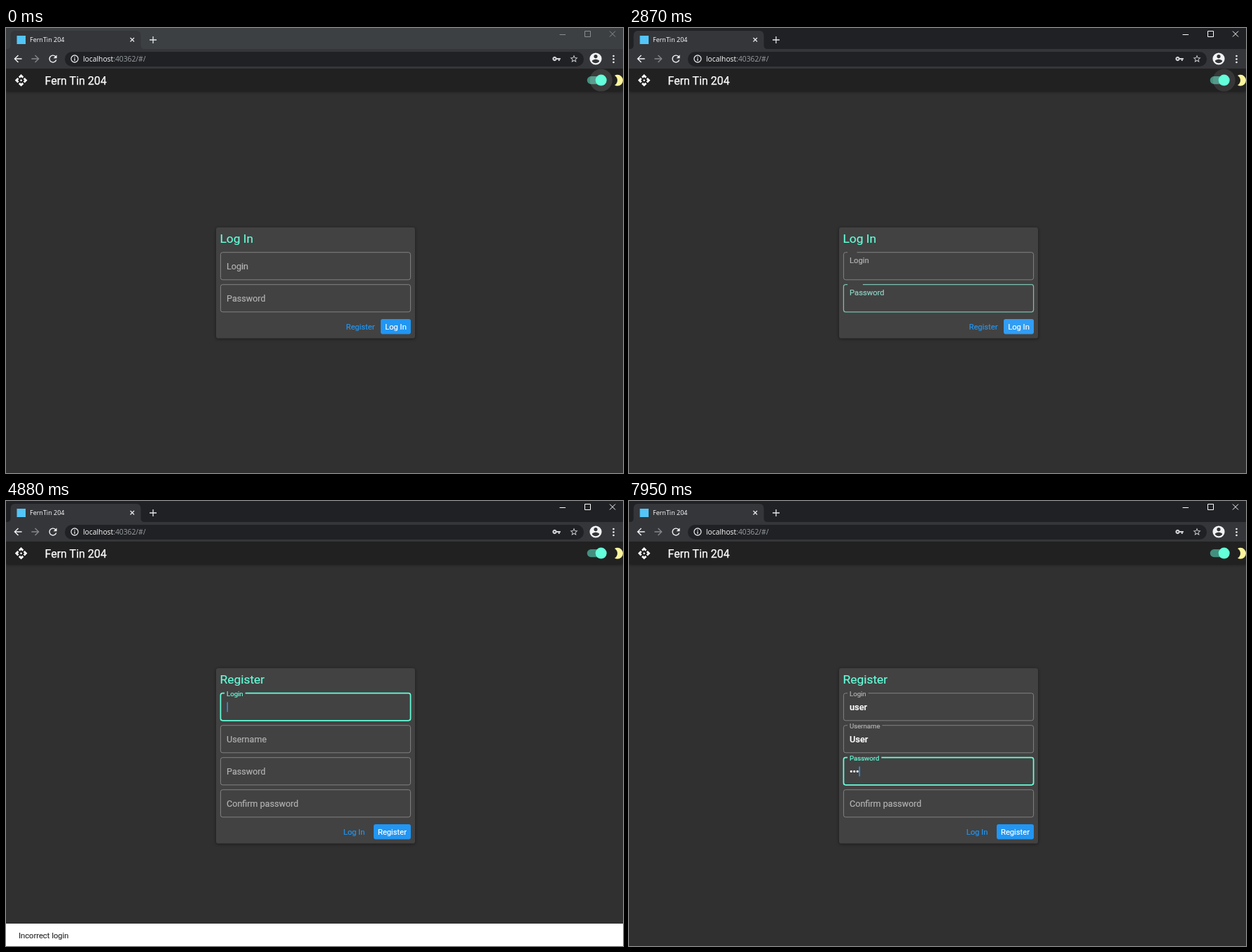
An HTML page for the animation above (7990 ms loop, 881x636 px).

```html
<!DOCTYPE html>
<html lang="en">
<head>
<meta charset="utf-8">
<title>Log in and register</title>
<style>
  html, body { margin: 0; width: 100%; height: 100%; overflow: hidden; background: #303030; }
  svg { display: block; width: 881px; height: 636px; font-family: Roboto, sans-serif; white-space: pre; }
  .ui { font-family: "Open Sans", sans-serif; }
  .card { filter: drop-shadow(0 1.5px 2px rgba(0, 0, 0, .45)); }
  .bar { filter: drop-shadow(0 1px 2px rgba(0, 0, 0, .5)); }
</style>
</head>
<body>
<svg viewBox="0 0 881 636">
  <rect width="881" height="636" fill="#303030"/>
  <rect class="bar" y="50" width="881" height="40" fill="#212121"/>
  <rect id="strip" width="881" height="31"/>
  <path d="M0 58V30H1Q6.500 30 6.500 25V11Q6.500 4 13 4H186Q192.500 4 192.500 11V25Q192.500 30 198 30H881V58Z" fill="#35363a"/>
  <rect x="84" y="34" width="741" height="21" rx="10.500" fill="#202124"/>

  <rect x="15.500" y="11" width="12.500" height="12" fill="#54c5f8"/>
  <g class="ui">
    <text x="34" y="20" font-size="9" fill="#fff">FernTin 204</text>
    <text x="110" y="48" font-size="10.300" fill="#9aa0a6"><tspan fill="#fff">localhost</tspan>:40362/#/</text>
  </g>
  <g fill="none" stroke="#e4e6e9" stroke-width="1.300">
    <path d="M177.500 14l5.500 5.500m0-5.500l-5.500 5.500M205 17H215M210 12V22"/>
    <circle cx="98" cy="44" r="5"/>
    <path d="M98 43.300V47M98 41V42.300"/>
  </g>
  <path id="winButtons" d="M790.500 9.500H799M826.500 4.500H834.500V12.500H826.500ZM862 4.500l8 8m0-8l-8 8" fill="none"/>

  <text x="55.500" y="80.500" font-size="16" fill="#fff" stroke="#fff" stroke-width=".25">Fern Tin 204</text>
  <rect x="829.700" y="69" width="26.400" height="11.200" rx="5.600" fill="#438f7e"/>
  <circle id="halo" cx="849.700" cy="74.600" r="16" fill="#fff"/>
  <circle cx="849.700" cy="74.600" r="8" fill="#64ffda"/>
  <g fill="#f1f3f4"><circle cx="867.500" cy="40" r="1.300"/><circle cx="867.500" cy="44.500" r="1.300"/><circle cx="867.500" cy="49" r="1.300"/></g>
  <g id="icons"></g>
  <g id="page"></g>
</svg>
<script>
const LOOP = 7990, LEFT = 306.4, RIGHT = 577.6, TEXT_X = 315;
const $ = id => document.getElementById(id);
const pen = document.createElement('canvas').getContext('2d');

// Fade from 0 to 1 between two times
const ramp = (t, a, b) => {
  const p = Math.min(1, Math.max(0, (t - a) / (b - a)));
  return p * p * (3 - 2 * p);
};
const mix = (a, b, p) => `rgb(${a.map((v, i) => Math.round(v + (b[i] - v) * p))})`;
const typed = (t, text, times) => text.slice(0, times.filter(k => t >= k).length);
const width = (text, size) => {
  pen.font = size + 'px Roboto, sans-serif';
  return pen.measureText(text).width;
};
// The thin stroke gives the slightly heavier letters of the app
const label = (x, y, size, fill, text, more = '') =>
  `<text x="${x}" y="${y}" font-size="${size}" fill="${fill}" stroke="${fill}" stroke-width=".2" ${more}>${text}</text>`;

const TEAL = [100, 255, 218], LINE = [138, 138, 138], HINT = [179, 179, 179];

function field(y, {name, value = '', focus = 0, lift = 0}) {
  const start = 312, gap = (width(name, 9.6) + 6) * lift, bottom = y + 39.1;
  const border = `M${start + gap} ${y}H${RIGHT - 3}q3 0 3 3V${bottom - 3}q0 3 -3 3H${LEFT + 3}` +
    `q-3 0 -3 -3V${y + 3}q0 -3 3 -3H${start}`;
  const caret = TEXT_X + width(value, 12.8) + .4;
  return `<path d="${border}" fill="none" stroke="${mix(LINE, TEAL, focus)}" stroke-width="${.9 + focus * .8}"/>` +
    label(TEXT_X, y + 24.4 - 19.8 * lift, 12.6 - 3 * lift, mix(HINT, TEAL, focus), name) +
    label(TEXT_X, y + 24, 12.8, '#fff', value, 'font-weight="500"') +
    (focus > .5 ? `<rect x="${caret}" y="${y + 12.8}" width="1.6" height="14" fill="#2196f3"/>` : '');
}

function card(top, {title, fields, link, linkX, button, glow = 0, alpha, scale = 1}) {
  if (alpha <= 0) return '';
  const base = top + 36.5 + 46 * fields.length;
  const w = Math.round(width(button, 11.2)) + 12;
  const x = 578 - w;
  const box = `x="${x}" y="${base + 2.5}" width="${w}" height="21.4" rx="2.8"`;
  return `<g opacity="${alpha}" transform="translate(442 364.2) scale(${scale}) translate(-442 -364.2)">
    <rect class="card" x="300" y="${top}" width="284" height="${base + 29.9 - top}" rx="3.2" fill="#424242"/>` +
    label(305.5, top + 22, 17.4, '#64ffda', title) +
    fields.map((f, i) => field(top + 35.7 + 46 * i, f)).join('') +
    label(linkX, base + 17.3, 11.2, '#2196f3', link, 'text-anchor="middle"') +
    `<rect ${box} fill="#2196f3"/><rect ${box} fill="#fff" opacity="${glow * .08}"/>` +
    label(x + w / 2, base + 17.3, 11.2, '#fff', button, 'text-anchor="middle"') + '</g>';
}

function snackbar(t) {
  const open = ramp(t, 2870, 3100) - ramp(t, 5820, 6130);
  if (open <= 0) return '';
  const y = 636 - 32 * open;
  const ink = ramp(t, 3010, 3110) - ramp(t, 5820, 5960);
  return `<rect y="${y}" width="881" height="33" fill="#fff"/>` +
    label(18, y + 21, 11.2, '#333', 'Incorrect login', `opacity="${ink}"`);
}

function draw(t) {
  const active = t >= 260;
  $('strip').setAttribute('fill', active ? '#202124' : '#3c4043');
  $('winButtons').setAttribute('stroke', active ? '#fff' : '#8b8e91');
  $('halo').setAttribute('opacity', .12 *
    (1 - ramp(t, 260, 460) + ramp(t, 2790, 2900) - ramp(t, 4550, 4690)));

  const cleared = t >= 2770, drop = ramp(t, 2770, 2960);
  const toPass = ramp(t, 1740, 1920);
  const swap = Math.min(1, Math.max(0, (t - 3690) / 240));
  const login = {
    title: 'Log In', link: 'Register', linkX: 506, button: 'Log In',
    alpha: 1 - swap * swap,
    glow: ramp(t, 2770, 2900) - ramp(t, 3390, 3440),
    fields: [
      {name: 'Login', value: cleared ? '' : typed(t, 'user', [1020, 1250, 1350, 1550]),
       focus: ramp(t, 270, 470) - toPass, lift: ramp(t, 290, 500) - drop},
      {name: 'Password', value: cleared ? '' : typed(t, '•••••••', [2050, 2050, 2050, 2110, 2150, 2180, 2210]),
       focus: toPass - drop, lift: toPass - drop}
    ]
  };

  const toLogin = ramp(t, 4530, 4700), toName = ramp(t, 6330, 6460), toCode = ramp(t, 7260, 7460);
  const register = {
    title: 'Register', link: 'Log In', linkX: 497, button: 'Register',
    alpha: Math.min(1, swap * 1.35), scale: .81 + .19 * swap,
    fields: [
      {name: 'Login', value: typed(t, 'user', [5250, 5370, 5510, 5810]),
       focus: toLogin - toName, lift: toLogin},
      {name: 'Username', value: typed(t, 'User', [6670, 6770, 7000, 7100]),
       focus: toName - toCode, lift: toName},
      {name: 'Password', value: typed(t, '•••', [7620, 7760, 7950]),
       focus: toCode, lift: toCode},
      {name: 'Confirm password'}
    ]
  };
  $('page').innerHTML = card(285, login) + card(239, register) + snackbar(t);
}

// Icons on a 24-unit grid: centre x, centre y, scale, colour, path
$('icons').innerHTML = [
  [17, 44, .7, '#f1f3f4', 'M20 11H7.83l5.59-5.59L12 4l-8 8 8 8 1.41-1.41L7.83 13H20z'],
  [42, 44, .7, '#85888c', 'M12 4l-1.41 1.41L16.17 11H4v2h12.17l-5.58 5.59L12 20l8-8z'],
  [67, 44, .7, '#f1f3f4', 'M17.65 6.35A8 8 0 1 0 19.73 14H17.65A6 6 0 1 1 16.22 7.78L13 11h7V4z'],
  [786, 44, .52, '#d0d3d6', 'M12.65 10A6 6 0 1 0 12.65 14H17v4h4v-4h2v-4zM7 14a2 2 0 1 1 0-4 2 2 0 0 1 0 4z'],
  [811, 44, .55, '#d0d3d6', 'M22 9.24l-7.19-.62L12 2 9.19 8.63 2 9.24l5.46 4.73L5.82 21 12 17.27 18.18 21l-1.63-7.03zM12 15.4l-3.76 2.27 1-4.28-3.32-2.88 4.38-.38L12 6.1l1.71 4.04 4.38.38-3.32 2.88 1 4.28z'],
  [842, 44, .86, '#f1f3f4', 'M12 2a10 10 0 1 0 0 20 10 10 0 0 0 0-20zm0 3a3 3 0 1 1 0 6 3 3 0 0 1 0-6zm0 14.2c-2.5 0-4.71-1.28-6-3.22.03-1.99 4-3.08 6-3.08s5.97 1.09 6 3.08c-1.29 1.94-3.5 3.22-6 3.22z'],
  [21.6, 74.8, .8, '#fff', 'M14 12l-2 2-2-2 2-2zM12 6l2.12 2.12 2.5-2.5L12 1 7.38 5.62l2.5 2.5zM6 12l2.12-2.12-2.5-2.5L1 12l4.62 4.62 2.5-2.5zM18 12l-2.12 2.12 2.5 2.5L23 12l-4.62-4.62-2.5 2.5zM12 18l-2.12-2.12-2.5 2.5L12 23l4.62-4.62-2.5-2.5z'],
  [874.6, 74.8, .8, '#fff59d', 'M10 2Q7.300 2 5 3.350A10 10 0 0 1 5 20.650Q7.300 22 10 22A10 10 0 0 0 10 2z']
].map(([x, y, s, fill, d]) =>
  `<path transform="translate(${x} ${y}) scale(${s}) translate(-12 -12)" fill="${fill}" d="${d}"/>`).join('');

function tick() {
  draw(performance.now() % LOOP);
  requestAnimationFrame(tick);
}
tick();
</script>
</body>
</html>
```
